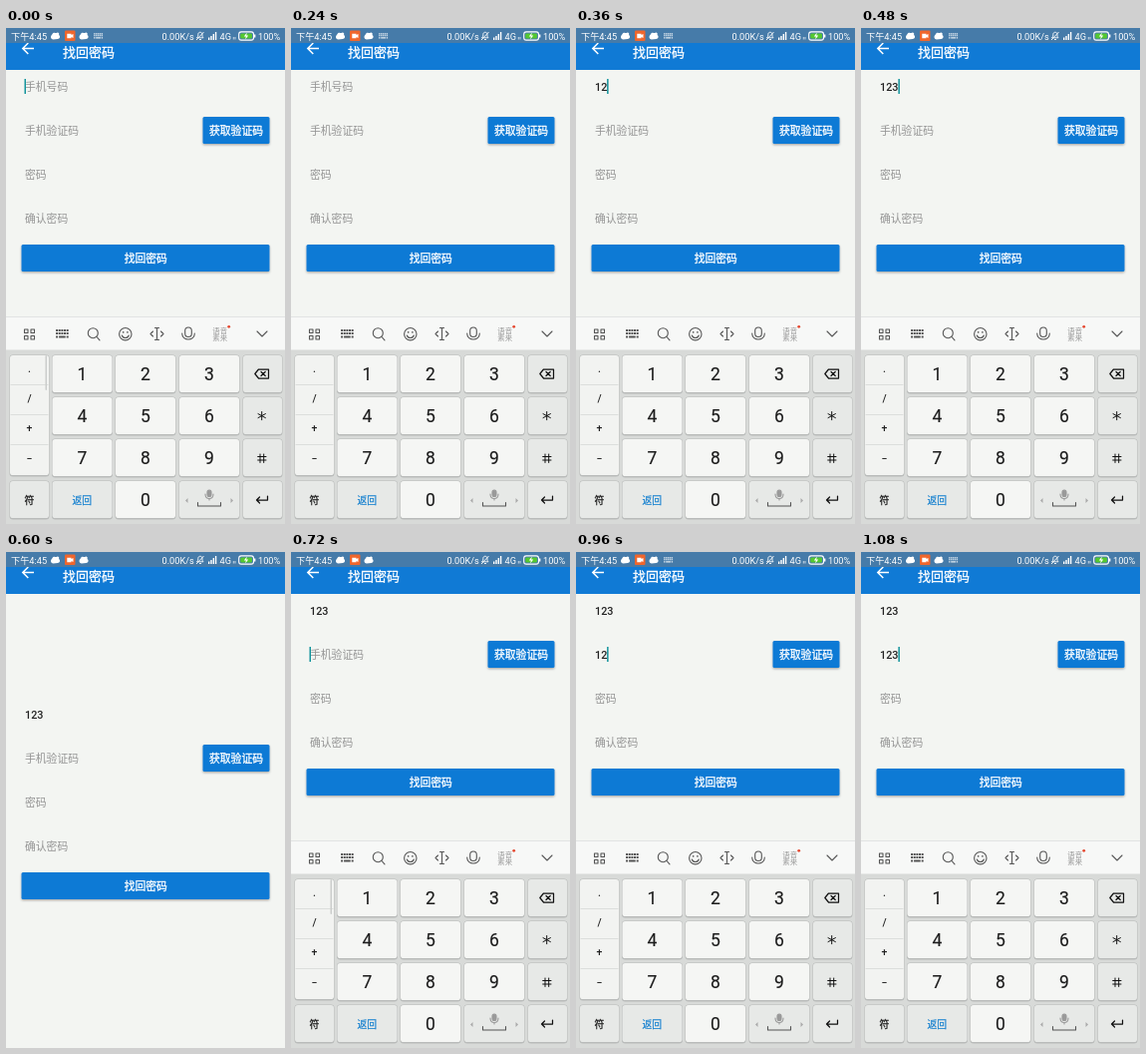
Recreate the animation shown at these times as an HTML page. Size 280x497 px, loop 1200 ms.

```html
<!DOCTYPE html>
<html lang="zh-CN">
<head>
<meta charset="utf-8">
<title>找回密码</title>
<style>
html, body { margin: 0; width: 100%; height: 100%; overflow: hidden; background: #f3f5f2; }
svg { display: block; width: 100vw; height: 100vh; }
text { font-family: Roboto, "Noto Sans CJK SC", "Noto Sans CJK", sans-serif; }
.status text { font-size: 9.2px; fill: #fff; }
.field { font-size: 10.8px; fill: #949494; }
.typed { font-size: 10.8px; font-weight: 500; fill: #222; }
.bold { fill: #fff; stroke: #fff; stroke-width: .3px; }
.blue { fill: #107ad5; }
.digit { font-size: 17.5px; fill: #1c1c1c; stroke: #1c1c1c; stroke-width: .15px; text-anchor: middle; }
.mid { text-anchor: middle; }
.line { fill: none; stroke: #555; stroke-width: 1.1; stroke-linecap: round; stroke-linejoin: round; }
.dark { stroke: #111; stroke-width: 1.25; }
.caret { fill: #12949c; }
</style>
</head>
<body>
<svg viewBox="0 0 280 497" preserveAspectRatio="none">
  <defs>
    <filter id="lift" x="-10%" y="-20%" width="120%" height="160%">
      <feDropShadow dx="0" dy="1.2" stdDeviation="1.1" flood-color="#000" flood-opacity=".32"/>
    </filter>
    <path id="blob" d="M-4.5 1C-4.5-1-3-1-3-2C-2-4 0-3 1-3C2.5-4.5 4.5-3 3.5-1C5.5 0 4.5 3 2.5 3L-2 3.5C-3.5 3.5-4.5 2.5-4.5 1Z" fill="#fff"/>
    <g id="keys" fill="none">
      <path d="M-6.2-3.6H6.4M-6.2-.4H6.4" stroke-width="2" stroke-dasharray="2 .65"/>
      <path d="M-6.2 3H-4.2M-3.2 3H3.4M4.4 3H6.4" stroke-width="2"/>
    </g>
  </defs>
  <rect width="280" height="497" fill="#f3f5f2"/>

  <g id="form">
    <text id="hint0" class="field" x="19" y="62.7">手机号码</text>
    <text id="hint1" class="field" x="19" y="106.7">手机验证码</text>
    <text class="field" x="19" y="150.7">密码</text>
    <text class="field" x="19" y="194.9">确认密码</text>
    <text id="typed0" class="typed" x="19" y="62.6"></text>
    <text id="typed1" class="typed" x="19" y="106.8"></text>
    <rect id="caret" class="caret" width="1.5" height="15"/>
    <rect class="blue" x="197.5" y="89" width="67" height="27" rx="1.5" filter="url(#lift)"/>
    <text class="field bold mid" x="231" y="106.9">获取验证码</text>
    <rect class="blue" x="15.5" y="217" width="249" height="27" rx="1.5" filter="url(#lift)"/>
    <text class="field bold mid" x="140.3" y="234.7">找回密码</text>
  </g>

  <rect class="blue" width="280" height="42"/>
  <path d="M28 20.5H17M22.3 15L16.8 20.5L22.3 26" fill="none" stroke="#fff" stroke-width="1.5"/>
  <text class="bold" x="57" y="29.2" font-size="13">找回密码</text>

  <g class="status">
    <rect width="280" height="15" fill="#467ba9"/>
    <text x="5" y="11.5">下午4:45</text>
    <use href="#blob" x="49.5" y="8"/>
    <rect x="59" y="2.5" width="10.5" height="10.5" rx="1" fill="#f0662c"/>
    <path d="M61.3 5.8H65.5V7L67.5 6V10L65.5 9V10.2H61.3Z" fill="#fff"/>
    <use href="#blob" x="78" y="8"/>
    <use id="note" href="#keys" stroke="#e3ebf2" transform="translate(92.5 8) scale(.72 .6)"/>
    <text x="156.5" y="11.5">0.00K/s</text>
    <path d="M191.5 9.8H198L197 8.3V6.5C197 3.5 192.8 3.5 192.8 6.5V8.3ZM194 11.5H196M198.5 4L191 12" fill="none" stroke="#fff" stroke-width=".9"/>
    <path d="M203.7 9.5V12M206 8V12M208.3 6V12M210.6 4V12" stroke="#fff" stroke-width="1.4"/>
    <text x="214.5" y="11.5">4G</text>
    <path d="M228.3 9V11.5M230 9V11.5" stroke="#fff" stroke-width=".7"/>
    <rect x="233.7" y="3.9" width="14.8" height="8.2" rx="2.4" fill="none" stroke="#fff" stroke-width="1.1"/>
    <rect x="235.3" y="5.5" width="11.6" height="5" rx="1" fill="#54c92f"/>
    <path d="M249.7 6.5V9.5" stroke="#fff" stroke-width="1.4"/>
    <path d="M241.8 4.6L238.8 8.5H240.8L240.2 11.4L243.2 7.5H241.2Z" fill="#fff"/>
    <text x="253" y="11.5">100%</text>
  </g>

  <g id="board">
    <rect y="289" width="280" height="34" fill="#f7f8f7"/>
    <path d="M0 289.5H280" stroke="#e2e4e3"/>
    <rect y="322.5" width="280" height="174.5" fill="#d8dad8"/>
    <g class="line">
      <path d="M18.5 302H22V305.5H18.5ZM25 302H28.5V305.5H25ZM18.5 308.5H22V312H18.5ZM25 308.5H28.5V312H25Z"/>
      <circle cx="87.3" cy="305.7" r="5"/><path d="M91 309.5L94 312.8"/>
      <circle cx="119.8" cy="306.7" r="6.2"/><path d="M116.3 308C117.5 311.3 122.1 311.3 123.3 308"/>
      <path d="M117.7 304.8V305M121.9 304.8V305" stroke-width="1.6"/>
      <path d="M149.5 300.5H153.5M151.5 300.5V312.5M149.5 312.5H153.5M147.5 304L145 306.5L147.5 309M155.5 304L158 306.5L155.5 309"/>
      <rect x="179.7" y="300" width="6.6" height="9.5" rx="3.3"/>
      <path d="M176.7 306C176.7 314 189.3 314 189.3 306"/>
      <path d="M252 304L257 309L262 304"/>
    </g>
    <use href="#keys" stroke="#555" transform="translate(56.3 306.5)"/>
    <g font-size="7.4" fill="#999"><text x="207.3" y="306.2">语音</text><text x="207.3" y="312.8">素来</text></g>
    <circle cx="223.7" cy="299.3" r="1.4" fill="#e5482f"/>
    <g id="pad"></g>
    <path d="M4.5 357.5H42.5M4.5 387.5H42.5M4.5 417.5H42.5" stroke="#dcdedc"/>
    <rect id="bar" x="39.5" y="328" width="1.5" height="35" rx=".7" fill="#cbcdcc"/>
    <g class="line dark">
      <path d="M249.8 346.5L253.5 342H263.5V351H253.5ZM256 344.5L260.2 348.5M260.2 344.5L256 348.5"/>
      <path d="M256.7 384.5V392.7M253 386.6L260.4 390.6M260.4 386.6L253 390.6" stroke-width="1"/>
      <path d="M255 427V435.5M258.7 427V435.5M252.7 429.5H261M252.7 433H261" stroke-width="1"/>
      <path d="M262.5 469V473H251.5M254.5 470L251.5 473L254.5 476"/>
    </g>
    <g class="line" style="stroke:#999">
      <rect x="202" y="463" width="4" height="6.5" rx="2" fill="#999"/>
      <path d="M200 467C200 473 208 473 208 467M204 471.5V473"/>
      <path d="M192.5 475.5V479H215.5V475.5" style="stroke:#555"/>
    </g>
    <path d="M182.5 471L180 473.5L182.5 476ZM225.5 471L228 473.5L225.5 476Z" fill="#aaa"/>
  </g>
</svg>
<script>
const $ = id => document.getElementById(id);
const pad = $("pad");

function add(tag, attrs, text = "") {
  const el = document.createElementNS("http://www.w3.org/2000/svg", tag);
  for (const k in attrs) el.setAttribute(k, attrs[k]);
  el.textContent = text;
  pad.append(el);
}

function key(x, y, w, h, fill) {
  add("rect", { x: x - .5, y: y - .5, width: w + 1, height: h + 2, rx: 3.2, fill: "#b9bbba" });
  add("rect", { x, y, width: w, height: h, rx: 2.8, fill });
}

const light = "#f5f6f4", grey = "#e7e9e7";
const cols = [46.5, 110, 174], rows = [328, 370, 412, 454];
key(4, 328, 39, 120, "#f2f3f1");
[..."./+−"].forEach((c, i) => add("text", {
  x: 23.5, y: [345, 374.5, 404.5, 434.5][i], "font-size": 10.5, "font-weight": 500, fill: "#222", class: "mid"
}, c));
rows.forEach((y, r) => {
  key(238, y, 39, 37, grey);
  cols.forEach((x, c) => {
    key(x, y, 60, 37, r < 3 || c === 1 ? light : grey);
    const n = r < 3 ? r * 3 + c + 1 : c === 1 ? 0 : "";
    add("text", { x: x + 30, y: y + 25.2, class: "digit" }, n);
  });
});
key(4, 454, 39, 37, grey);
add("text", { x: 23.3, y: 476.5, "font-size": 9.8, fill: "#222", stroke: "#222", "stroke-width": .3, class: "mid" }, "符");
add("text", { x: 76.3, y: 476.5, "font-size": 9.8, fill: "#1b83d0", stroke: "#1b83d0", "stroke-width": .25, class: "mid" }, "返回");

// start ms, phone, code, active field (-1: no caret), keyboard open, scrollbar, status icon
const steps = [
  [0, "", "", 0, 1, 1, 1],
  [240, "", "", -1, 1, 0, 1],
  [360, "12", "", 0, 1, 0, 1],
  [480, "123", "", 0, 1, 0, 1],
  [600, "123", "", -1, 0, 0, 0],
  [720, "123", "", 1, 1, 1, 0],
  [840, "123", "", -1, 1, 0, 1],
  [960, "123", "12", 1, 1, 0, 1],
  [1080, "123", "123", 1, 1, 0, 1]
];
const show = (id, on) => $(id).setAttribute("visibility", on ? "visible" : "hidden");
let last;

function draw(now) {
  const t = now % 1200;
  const step = steps.filter(s => s[0] <= t).pop() || steps[0];
  if (step === last) return;
  last = step;
  const [, phone, code, active, open, bar, note] = step;
  [phone, code].forEach((s, i) => {
    $("typed" + i).textContent = s;
    show("hint" + i, !s);
  });
  show("caret", active >= 0);
  if (active >= 0) {
    const n = (active ? code : phone).length;
    $("caret").setAttribute("x", 18.5 + n * 6.3);
    $("caret").setAttribute("y", active ? 95 : 51);
  }
  $("form").setAttribute("transform", `translate(0 ${open ? 0 : 104})`);
  show("board", open);
  show("note", note);
  show("bar", bar);
}

const start = performance.now();
function tick() {
  draw(performance.now() - start);
  requestAnimationFrame(tick);
}
tick();
</script>
</body>
</html>
```
